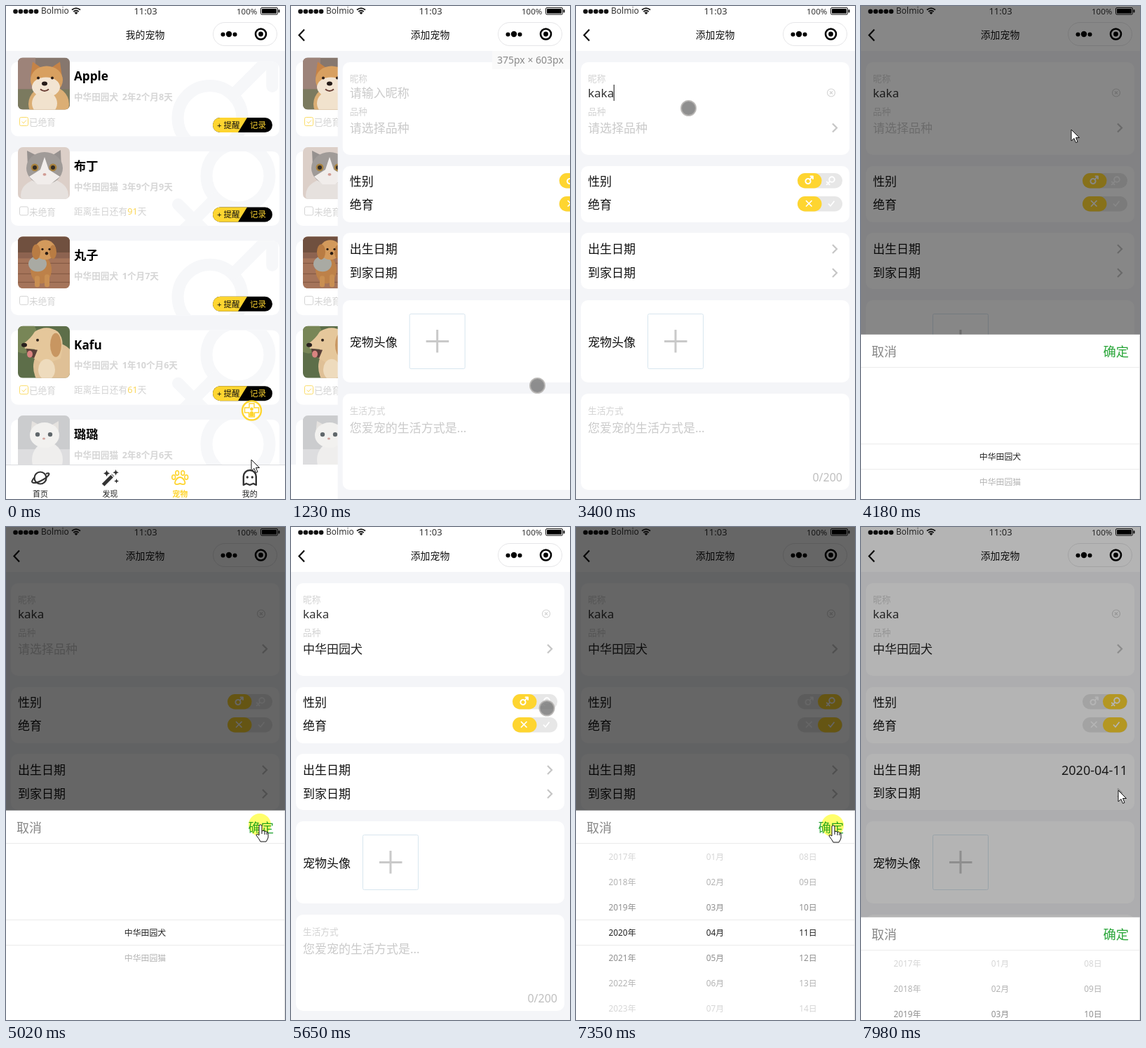
These frames come from a looping animation (398x702 px, 8 s). An HTML page:

```html
<!DOCTYPE html>
<html lang="zh-CN">
<head>
<meta charset="utf-8">
<title>添加宠物</title>
<style>
html, body { margin: 0; width: 100%; height: 100%; overflow: hidden; background: #fff; }
svg { display: block; width: 100%; height: 100%; }
text { font-family: 'Noto Sans', 'Noto Sans CJK SC', 'Noto Sans CJK JP', sans-serif; white-space: pre; }
</style>
</head>
<body>
<svg id="stage" viewBox="0 0 398 702" xmlns="http://www.w3.org/2000/svg"></svg>
<script>
const LOOP = 8000;
const BG = '#f4f5f8', MARK = '#f6f7f9', YELLOW = '#fed530', PALE = '#d3d3d3', HINT = '#cacaca';

// ---- drawing helpers; cy is the middle of the line of text
const label = (s, x, cy, size, fill = '#111', more = '') =>
  `<text x="${x}" y="${cy + size * .37}" font-size="${size}" fill="${fill}" ${more}>${s}</text>`;
const mid = 'text-anchor="middle"', end = 'text-anchor="end"', bold = 'font-weight="700"';
const box = (x, y, w, h, fill, r = 0, more = '') =>
  `<rect x="${x}" y="${y}" width="${w}" height="${h}" rx="${r}" fill="${fill}" ${more}/>`;
const dot = (x, y, r, fill, more = '') => `<circle cx="${x}" cy="${y}" r="${r}" fill="${fill}" ${more}/>`;
const oval = (x, y, a, b, fill) => `<ellipse cx="${x}" cy="${y}" rx="${a}" ry="${b}" fill="${fill}"/>`;
const shape = (d, fill) => `<path d="${d}" fill="${fill}"/>`;
const line = (d, color, w = 1, more = '') => `<path d="${d}" fill="none" stroke="${color}" stroke-width="${w}" ${more}/>`;
const group = (s, x = 0, y = 0, more = '') => `<g transform="translate(${x} ${y})" ${more}>${s}</g>`;
const round = 'stroke-linecap="round" stroke-linejoin="round"';

function sexSign(male, x, y, r, w, color) {
  const a = r * .72, b = r * 1.93, c = r * .95, k = r * 1.4, h = r * .5;
  const d = male
    ? `M${a} ${-a}L${b} ${-b}M${b - c} ${-b}H${b}V${c - b}`
    : `M${-a} ${a}L${-b} ${b}M${-k - h} ${k - h}L${h - k} ${k + h}`;
  return group(dot(0, 0, r, 'none', `stroke="${color}" stroke-width="${w}"`) + line(d, color, w, round), x, y);
}
const chevron = (x, y) => line(`M${x - 3} ${y - 6}l6 6-6 6`, '#c6c6c6', 2.2);

// ---- pet list
const eyes = (x, y, gap, r, c) => dot(x - gap, y, r, c) + dot(x + gap, y, r, c);
const photos = [
  box(0, 0, 74, 74, '#86776e') + box(0, 0, 25, 45, '#9d8379') + shape('M0 45H74V74H0z', '#7b7a5f') +
    oval(44, 66, 29, 26, '#dbae74') + shape('M18 27L21 6 34 15 48 14 60 6 63 28z', '#c58347') +
    oval(41, 32, 23, 20, '#d8a060') + oval(40, 42, 20, 14, '#f2e4d2') + oval(38, 65, 18, 17, '#f1e2cd') +
    eyes(39, 29, 10, 2, '#2b1d16') + oval(38, 37, 4, 3, '#251b18') + line('M32 45Q38 50 44 45', '#6b3f35', 2),
  box(0, 0, 74, 74, '#dccfc8') + oval(38, 68, 34, 24, '#e6e1de') + shape('M14 28L13 5 29 13H47L61 4 62 30z', '#96918f') +
    oval(38, 30, 26, 23, '#a09b98') + shape('M38 14L44 32 60 42 46 53H28L16 42 32 32z', '#f1edeb') +
    eyes(37, 29, 13, 5.4, '#a8823f') + eyes(37, 29, 13, 3, '#332c26') + oval(38, 39, 2.5, 1.8, '#d19b94'),
  box(0, 0, 74, 74, '#a5745a') + box(0, 0, 74, 23, '#70503f') + box(0, 23, 74, 8, '#8d6350') +
    line('M0 38H74M0 53H74M0 65H74', '#875b45', 1.2) +
    oval(33, 47, 15, 20, '#bd8149') + oval(28, 39, 13, 11, '#a9aaa3') + oval(39, 19, 15, 14, '#d39a5c') +
    oval(26, 22, 6, 11, '#b97c43') + oval(50, 22, 5, 10, '#b97c43') + box(24, 56, 7, 16, '#c98f52', 3) +
    box(38, 54, 7, 18, '#c98f52', 3) + eyes(40, 18, 5, 1.6, '#291b13') + dot(41, 24, 2.2, '#291b13'),
  box(0, 0, 74, 74, '#5d6e49') + oval(8, 15, 20, 24, '#788657') + oval(53, 58, 31, 34, '#dfc096') +
    shape('M8 25Q18 18 24 8 41-3 57 8 68 19 61 46L38 55 21 45 24 33 10 32z', '#e5c79b') +
    oval(54, 27, 8, 17, '#c89661') + shape('M12 32L28 34 23 46 13 40z', '#594039') + oval(17, 40, 4, 5, '#d98480') +
    oval(41, 62, 12, 15, '#eedbbd') + dot(28, 20, 2, '#30241d') + oval(9, 27, 4, 3, '#29211e'),
  box(0, 0, 74, 74, '#cbccce') + box(0, 48, 74, 26, '#dddddf') + oval(42, 63, 22, 25, '#efeeed') +
    shape('M18 27L20 8 33 15H46L58 8 58 28z', '#e5e2df') + oval(38, 28, 21, 18, '#f2f1ef') +
    eyes(37, 27, 9, 3.2, '#60676b') + oval(37, 33, 2, 1.5, '#d4a7a2')
];
const pets = [
  { name: 'Apple', kind: '犬', age: '2年2个月8天', done: 1, male: 1 },
  { name: '布丁', kind: '猫', age: '3年9个月9天', days: 91 },
  { name: '丸子', kind: '犬', age: '1个月7天', male: 1 },
  { name: 'Kafu', kind: '犬', age: '1年10个月6天', done: 1, days: 61 },
  { name: '璐璐', kind: '猫', age: '2年8个月6天' }
];
function petCard(p, i) {
  const sign = p.male ? sexSign(true, 291, 80, 46, 17, MARK) : sexSign(false, 331, 35, 45, 17, MARK);
  const tick = box(19.5, 79, 12, 12, 'none', 2, `stroke="${p.done ? '#fbdc68' : PALE}"`) +
    (p.done ? line('M22.5 85l2.5 2.5 4-4.5', '#fbdc68') : '');
  const birthday = p.days
    ? label(`距离生日还有<tspan fill="#fad75b">${p.days}</tspan>天`, 97, 85, 12.7, PALE) : '';
  const pill = box(0, 0, 85, 21, '#000', 10.5) + shape('M10.5 0H49L36 21H10.5a10.5 10.5 0 0 1 0-21z', YELLOW) +
    label('+ 提醒', 6, 10.5, 11.5) + label('记录', 53, 10.5, 11.5, YELLOW);
  return group(
    box(7, 0, 383, 106, '#fff', 10) + `<g clip-path="url(#card)">${sign}</g>` +
    group(photos[i], 17, -6, 'clip-path="url(#photo)"') +
    label(p.name, 97, 20.5, 17.2, '#000', bold) +
    label(`中华田园${p.kind} ${p.age}`, 97, 50, 12.6, '#d6d6d6', bold + ' word-spacing="2.5"') +
    tick + label(p.done ? '已绝育' : '未绝育', 33, 86, 12.7, PALE) + birthday + group(pill, 295, 79.5),
    0, 79.5 + 127.4 * i);
}
const addButton = group(
  dot(0, 0, 13.5, '#fff', `stroke="${YELLOW}" stroke-width="2.4"`) +
  line('M-3.5-10H3.5V-4H10V3H4V9H-4V3H-10V-4H-3.5z', YELLOW, 1.4) +
  dot(0, -2, 2.4, YELLOW) + shape('M-3 8Q-4 1 0 1 4 1 3 8z', YELLOW), 350.5, 576);

// ---- tab bar
const ink = '#333';
const tabs = [
  ['首页', dot(0, 0, 8.5, 'none', `stroke="${ink}" stroke-width="2.2"`) +
    line('M-8-1C-17 8-9 9 1 4 13-2 16-9 8-6', ink, 2)],
  ['发现', line('M-10 10L4-4', ink, 5) + line('M1-5L5-1', '#fff', 1.2) +
    shape('M-5-11l1.5 3 3 1.5-3 1.5-1.5 3-1.5-3-3-1.5 3-1.5zM8-12l1.2 3 3 1.2-3 1.2-1.2 3-1.2-3-3-1.2 3-1.2zM9 1l1 2.4 2.4 1-2.4 1-1 2.4-1-2.4-2.4-1 2.4-1z', ink)],
  ['宠物', [[-9, -1], [-4, -7], [4, -7], [9, -1]].map(([x, y]) =>
    `<ellipse cx="${x}" cy="${y}" rx="2.4" ry="3.2" fill="none" stroke="${YELLOW}" stroke-width="1.6"/>`).join('') +
    line('M0-1C4-1 8 5 7 8 5 11 2 8 0 8-2 8-5 11-7 8-8 5-4-1 0-1z', YELLOW, 1.8)],
  ['我的', line('M-9 10V-2A9 9 0 0 1 9-2V10L5 8 0 10-5 8z', ink, 2.4, round) + eyes(0, -1, 3.5, 1.7, ink)]
];
const tabBar = box(0, 653, 398, 49, '#fff') + line('M0 653.5H398', '#dcdde0') + tabs.map(([name, icon], i) =>
  group(icon, 49 + 99.6 * i, 672) +
  label(name, 49 + 99.6 * i, 695, 11, i == 2 ? YELLOW : '#222', mid + (i == 2 ? ' ' + bold : ''))).join('');

// ---- form
const toggle = (id, y, icons) => box(316, y, 64, 21.5, '#e7e7e7', 10.75) +
  `<rect id="${id}" y="${y}" width="34.5" height="21.5" rx="10.75" fill="${YELLOW}"/>` + icons;
const form = box(0, 64, 398, 638, BG) +
  [[80, 132], [228, 80], [323, 80], [419, 117], [552, 137]].map(([y, h]) => box(7, y, 383, h, '#fff', 10)).join('') +
  label('昵称', 17, 103, 12.7, PALE) + label('', 17, 124, 17, '#333', 'id="nick"') +
  `<path id="caret" fill="none" stroke="#333" stroke-width="1.2"/>` +
  `<g id="clear">${dot(364, 123.5, 5.5, 'none', 'stroke="#d3d3d3" stroke-width="1.1"')}${line('M362 121.5l4 4m0-4l-4 4', '#d3d3d3', 1.1)}</g>` +
  label('品种', 17, 150, 12.7, PALE) + label('', 17, 173.5, 17, '#222', 'id="breed"') + chevron(369, 173.5) +
  label('性别', 17, 250, 17) + label('绝育', 17, 283, 17) +
  toggle('sex', 238, sexSign(true, 331, 249.5, 3.6, 1.9, '#fff') + sexSign(false, 365, 247, 3.8, 1.9, '#fff')) +
  toggle('neuter', 271, line('M328 277l8.5 8.5m0-8.5l-8.5 8.5', '#fff', 1.7) + line('M360 281.5l3 3.3 5.5-7', '#fff', 1.7)) +
  label('出生日期', 17, 346, 17) + `<g id="birthArrow">${chevron(369, 346)}</g>` +
  label('2020-04-11', 380, 346, 18, '#222', end + ' id="birth"') +
  `<g id="home">${label('到家日期', 17, 380, 17)}${chevron(369, 380)}</g>` +
  label('宠物头像', 17, 478.5, 17) + box(102.5, 438.5, 79, 78, '#fff', 2, 'stroke="#d8e6ef"') +
  line('M126 477.5H158.5M142 461V493.5', '#c9c9c9', 3) +
  label('生活方式', 17, 576, 12.7, PALE) + label('您爱宠的生活方式是...', 17, 601, 17, HINT) +
  label('0/200', 380, 671, 16, '#bfbfbf', end);

// ---- status and title bar
const header = box(0, 0, 398, 64, '#fff') +
  [0, 1, 2, 3, 4].map(i => dot(13.5 + 7.4 * i, 7.7, 3.3, '#111')).join('') +
  label('Bolmio', 50, 7, 12, '#333') +
  line('M94 5.5Q100 .8 106 5.5M96.3 8Q100 5 103.7 8', '#111', 1.7) + shape('M97.5 9.5Q100 7.5 102.5 9.5L100 12z', '#111') +
  label('11:03', 199, 7.3, 13, '#333', mid) + label('100%', 329, 7.5, 11.5, '#333') +
  box(363.5, 2.5, 24, 9.5, '#fff', 1.5, 'stroke="#111"') + box(365, 4, 21, 6.5, '#000', .5) + box(388.5, 5, 2, 4.5, '#111', 1) +
  line('M19 33.5L11.5 41.5 19 49.5', '#111', 2.2, 'id="back"') +
  label('', 198.5, 41.2, 13.9, '#111', mid + ' id="title"') +
  box(295.5, 23.5, 91, 33, '#fff', 16.5, 'stroke="#e6e6e8"') +
  dot(309.5, 40.5, 3, '#000') + dot(318, 40, 4.2, '#000') + dot(326.5, 40.5, 3, '#000') +
  dot(363.5, 40, 7.5, 'none', 'stroke="#000" stroke-width="2.6"') + dot(363.5, 40, 3.4, '#000');

// ---- bottom sheet
const shade = ['#222', '#8f8f8f', '#b3b3b3', '#d6d6d6'];
const pad = n => String(n).padStart(2, '0');
const row = (s, x, k) => label(s, x, 174.5 + 36 * k, 11.9, shade[Math.abs(k)], mid);
const dates = [-3, -2, -1, 0, 1, 2, 3].map(k =>
  row(2020 + k + '年', 66, k) + row(pad(4 + k) + '月', 198.5, k) + row(pad(11 + k) + '日', 331, k)).join('');
const sheet = box(0, .6, 398, 299, '#fff') + line('M0 47.5H398M0 156.5H398M0 192.5H398', '#ebebeb') +
  line('M397.5 1V299', '#e4e4e4') + label('取消', 15, 25, 18, '#888') +
  label('确定', 382, 25, 18.3, '#2aa63a', end + ' font-weight="500"') +
  `<g id="breeds">${row('中华田园犬', 198.5, 0)}${label('中华田园猫', 198.5, 210.5, 11.9, '#b3b3b3', mid)}</g><g id="dates">${dates}</g>`;

const pointers = {
  arrow: '<path d="M0 0V16L4 12.5 6.5 18.5 9 17.5 6.5 11.5H11.5z" fill="#fff" stroke="#111"/>',
  touch: dot(0, 0, 10.5, '#6f6f6f', 'fill-opacity=".78" stroke="#b4b1af" stroke-opacity=".85" stroke-width="2"'),
  hand: '<path d="M-1 1Q1-1.5 3 1V9Q5 7 7 9.5 9 8 10 10.5 12 10 12 12V18Q11 21 9 24H1Q-1 20-5 15-5 12-1 15z" fill="#fff" stroke="#111" stroke-linejoin="round"/><path d="M3 9v4m4-3v4m3-3v3" stroke="#111"/>'
};

const stage = document.getElementById('stage');
stage.innerHTML = `<defs>
  <clipPath id="card"><rect x="7" width="383" height="106" rx="10"/></clipPath>
  <clipPath id="photo"><rect width="74" height="74" rx="7"/></clipPath>
  <clipPath id="view"><rect y="64" width="398" height="589"/></clipPath></defs>
  ${box(0, 0, 398, 702, '#fff')}
  <g id="list" clip-path="url(#view)">${box(0, 64, 398, 589, BG)}${pets.map(petCard).join('')}${addButton}</g>
  <g id="tabBar">${tabBar}</g><g id="form">${form}</g>${header}
  <g id="size">${box(287, 64, 111, 26, '#fafafa', 0, 'opacity=".9"')}${label('375px × 603px', 294, 77, 14, '#8a8a8a')}</g>
  ${box(0, 0, 398, 702, '#000', 0, 'id="mask"')}<g id="sheet">${sheet}</g>
  ${dot(0, 0, 16, '#ffff6c', 'id="press" style="mix-blend-mode:multiply"')}
  <g id="pointer">${Object.keys(pointers).map(k => `<g id="${k}">${pointers[k]}</g>`).join('')}</g>`;
const el = {};
stage.querySelectorAll('[id]').forEach(n => el[n.id] = n);

// ---- motion
const path = [
  [0, 350, 646, 'arrow'], [70, 350, 646, 'arrow'], [140, 356, 618, 'touch'], [280, 358, 582, 'touch'],
  [450, 358, 582, 'touch'], [830, 351.5, 540.5, 'touch'], [1300, 351.5, 540.5, 'touch'], [1750, 160.5, 145.5, 'touch'],
  [3540, 160.5, 145.5, 'touch'], [3820, 300, 176, 'touch'], [4000, 300, 176, 'arrow'], [4410, 300, 176, 'arrow'],
  [4800, 362, 424, 'hand'], [5100, 362, 424, 'touch'], [5190, 365, 320, 'touch'], [5250, 365, 320, 'touch'],
  [5600, 365, 258, 'touch'], [5950, 365, 258, 'touch'], [6200, 365, 285, 'touch'], [6400, 365, 285, 'touch'],
  [6580, 361.5, 342, 'touch'], [6810, 361.5, 342, 'arrow'], [7000, 361.5, 342, 'arrow'], [7280, 366, 425, 'hand'],
  [7440, 366, 425, 'touch'], [7441, 368, 418, 'touch'], [7700, 371, 384, 'touch'], [7890, 371, 384, 'touch'],
  [7891, 367, 375, 'arrow'], [LOOP, 367, 375, 'arrow']
];
const ramp = (t, from, span) => Math.min(1, Math.max(0, (t - from) / span));
const easeOut = p => 1 - (1 - p) ** 2;
const smooth = p => p * p * (3 - 2 * p);
const show = (id, on) => el[id].setAttribute('display', on ? 'inline' : 'none');
const move = (id, x, y) => el[id].setAttribute('transform', `translate(${x} ${y})`);
const opened = (t, from, until, fall) => easeOut(ramp(t, from, 300)) * (1 - ramp(t, until, fall));
const fill = (id, s, color) => { el[id].textContent = s; el[id].setAttribute('fill', color); };

function draw(t) {
  show('tabBar', t < 600);
  show('size', t >= 600 && t < 1600);
  show('form', t >= 990);
  show('back', t >= 990);
  el.title.textContent = t < 990 ? '我的宠物' : '添加宠物';
  move('form', 398 * (1 - easeOut(ramp(t, 990, 408))), 0);

  const typed = 'kaka'.slice(0, [2700, 2850, 2930, 3080].filter(at => t >= at).length);
  fill('nick', typed || '请输入昵称', typed ? '#333' : HINT);
  const caretX = typed ? 17 + el.nick.getComputedTextLength() : 17.8;
  el.caret.setAttribute('d', `M${caretX} 112V135`);
  show('caret', t >= 1950 && t < 2530 || t >= 2700 && t < 3820);
  show('clear', t >= 3400);
  fill('breed', t < 5250 ? '请选择品种' : '中华田园犬', t < 5250 ? HINT : '#222');
  el.sex.setAttribute('x', 316 + 29 * smooth(ramp(t, 5800, 200)));
  el.neuter.setAttribute('x', 316 + 29 * smooth(ramp(t, 6250, 200)));
  const dated = t >= 7520;
  show('birth', dated);
  show('birthArrow', !dated);
  move('home', 0, dated ? -1.5 : 0);

  const level = opened(t, 4020, 5100, 85) + opened(t, 6815, 7439, 1) + opened(t, 7895, LOOP, 1);
  el.mask.setAttribute('opacity', .6 * level);
  move('sheet', 0, 702 - 299 * level);
  show('breeds', t < 6000);
  show('dates', t >= 6000);

  const i = Math.max(0, path.findIndex(k => k[0] > t) - 1);
  const [t0, x0, y0, kind] = path[i], [t1, x1, y1] = path[i + 1];
  const p = smooth(ramp(t, t0, t1 - t0));
  const x = x0 + (x1 - x0) * p, y = y0 + (y1 - y0) * p;
  move('pointer', x, y);
  move('press', x, y);
  Object.keys(pointers).forEach(k => show(k, k === kind));
  show('press', t >= 4940 && t < 5100 || t >= 7300 && t < 7440);
}

const start = performance.now();
function tick() {
  draw((performance.now() - start) % LOOP);
  requestAnimationFrame(tick);
}
tick();
</script>
</body>
</html>
```
